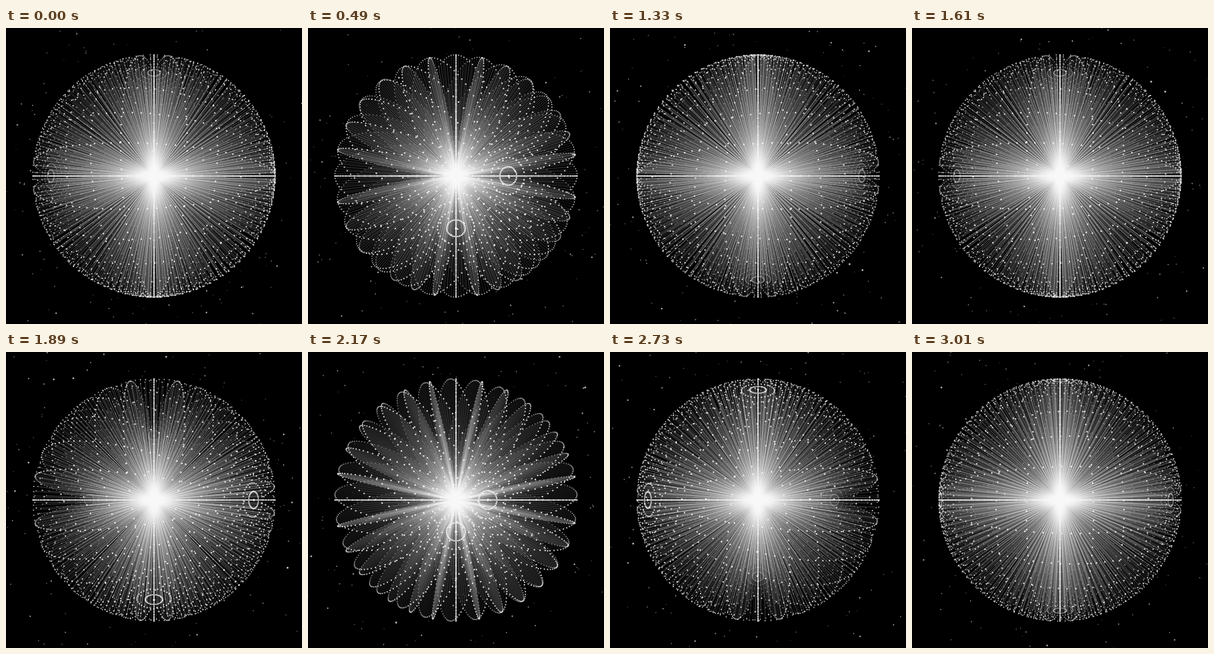
Animation, 500 px wide and 500 px high, one loop 3150 ms. Source, as an HTML page with a canvas:

```html
<!DOCTYPE html>
<html lang="en">
<head>
<meta charset="utf-8">
<title>Radial spheres</title>
<style>
  html, body { margin: 0; width: 100%; height: 100%; overflow: hidden; background: #000; }
  canvas { display: block; width: 500px; height: 500px; }
</style>
</head>
<body>
<canvas id="stage" width="500" height="500"></canvas>
<script>
const ctx = document.getElementById('stage').getContext('2d');
const SIZE = 500, MID = SIZE / 2;
const RADIUS = 196, FOCUS = 679;
const MERIDIANS = 30, PARALLELS = 54, STARS = 120;
const STEP = 70, LOOP = 3150, LAST = 43;
const START = 74, TURN = 180 / 23; // degrees, degrees per step

let seed = 41;
function random() {
  seed = (seed * 16807) % 2147483647;
  return seed / 2147483647;
}

function polar(radius, lat, lon) {
  return {
    a: radius * Math.sin(lat) * Math.sin(lon),
    b: radius * Math.sin(lat) * Math.cos(lon),
    c: radius * Math.cos(lat)
  };
}

// Every meridian carries both poles, so the rays to them add up.
const globe = [];
for (let m = 0; m < MERIDIANS; m++) {
  for (let p = 0; p <= PARALLELS; p++) {
    globe.push(polar(RADIUS, Math.PI * p / PARALLELS, 2 * Math.PI * m / MERIDIANS));
  }
}

function makeStars() {
  return Array.from({ length: STARS }, () =>
    polar(215 + 125 * random(), Math.acos(2 * random() - 1), 2 * Math.PI * random()));
}
const clouds = [makeStars(), makeStars()];

// Tilt around the horizontal axis, or the vertical one when swapped.
function project(pt, sin, cos, swap) {
  const y = pt.b * cos + pt.c * sin;
  const z = pt.c * cos - pt.b * sin;
  const k = FOCUS / (FOCUS - z);
  const across = MID + pt.a * k, along = MID + y * k;
  return { x: swap ? along : across, y: swap ? across : along, z, k };
}

function dot(pt, size, alpha) {
  ctx.globalAlpha = alpha;
  ctx.beginPath();
  ctx.arc(pt.x, pt.y, size * pt.k, 0, 2 * Math.PI);
  ctx.fill();
}

function draw(step) {
  const angle = (START - TURN * step) * Math.PI / 180;
  const sin = Math.sin(angle), cos = Math.cos(angle);
  const place = (list, swap) => list.map(pt => project(pt, sin, cos, swap));

  ctx.globalAlpha = 1;
  ctx.fillStyle = '#000';
  ctx.fillRect(0, 0, SIZE, SIZE);
  ctx.fillStyle = ctx.strokeStyle = '#f5f5f5';
  ctx.lineWidth = 1;

  const points = [...place(globe, false), ...place(globe, true)];
  ctx.globalAlpha = 0.15;
  for (const pt of points) {
    ctx.beginPath();
    ctx.moveTo(MID, MID);
    ctx.lineTo(pt.x, pt.y);
    ctx.stroke();
  }
  for (const pt of points) dot(pt, 1, 0.58 + 0.36 * pt.z / RADIUS);
  clouds.forEach((cloud, i) => {
    for (const pt of place(cloud, i === 1)) dot(pt, 0.9, 0.42 + 0.22 * pt.z / RADIUS);
  });
}

let shown = -1;
const begin = performance.now();
function tick() {
  const time = (performance.now() - begin) % LOOP;
  const step = Math.min(Math.floor(time / STEP), LAST);
  if (step !== shown) {
    draw(step);
    shown = step;
  }
  requestAnimationFrame(tick);
}
tick();
</script>
</body>
</html>
```
